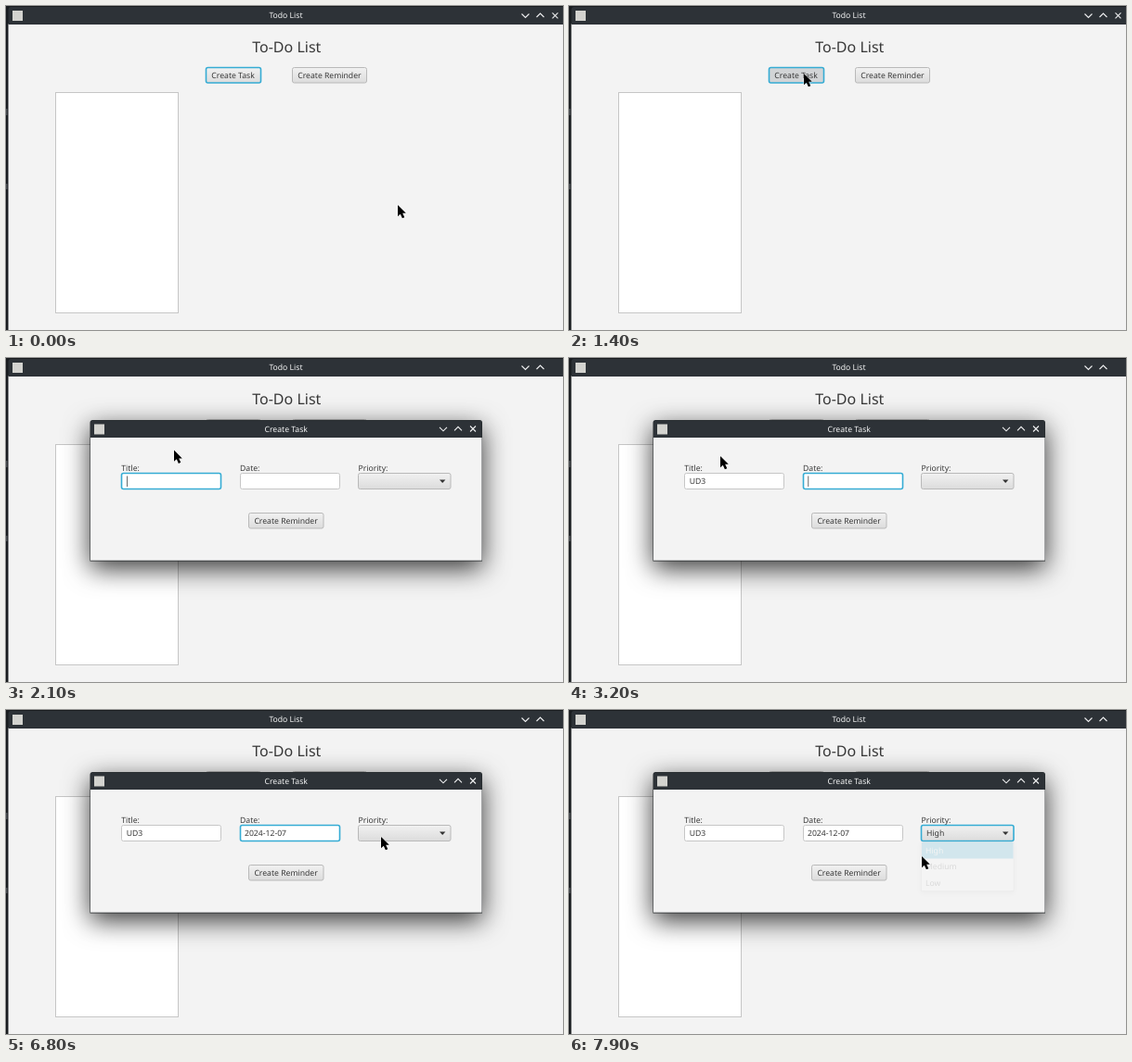
These frames come from a looping animation (600x350 px, 8000 ms). An HTML page:

```html
<!DOCTYPE html>
<html lang="en">
<head>
<meta charset="utf-8">
<title>Todo List</title>
<style>
  html, body { margin: 0; width: 100%; height: 100%; overflow: hidden; background: #f3f3f3; }
  svg { display: block; }
  text { font: 8.65px "Noto Sans", "Open Sans", sans-serif; fill: #383838; text-rendering: geometricPrecision; white-space: pre; }
  .mid { text-anchor: middle; }
  .bar { fill: #2d3237; }
  .caption { fill: #f4f5f5; text-anchor: middle; }
  .icon { fill: #d3d3cf; }
  .glyph { fill: none; stroke: #eff0f1; stroke-width: 1.1; }
  .button { fill: url(#face); stroke: #b9b9b9; }
  .field { fill: #fff; stroke: #c6c6c6; }
  .focus { stroke: #35acd4; stroke-width: 1.6; }
  .pressed { fill: #d2d4d6; }
  .shadow { filter: drop-shadow(0 8px 14px rgba(0, 0, 0, .78)); }
  .menu { fill: #fff; stroke: #c8c8c8; filter: drop-shadow(0 2px 3px rgba(0, 0, 0, .25)); }
  #hover { fill: #0096c9; }
  .row.on { fill: #fff; }
</style>
</head>
<body>
<svg width="600" height="350" viewBox="0 0 600 350">
  <defs>
    <linearGradient id="face" x2="0" y2="1">
      <stop stop-color="#f1f1f1"/><stop offset="1" stop-color="#dcdcdc"/>
    </linearGradient>
    <path id="down" class="glyph" d="M-4-2 0 2 4-2"/>
    <path id="up" class="glyph" d="M-4 2 0-2 4 2"/>
    <path id="cross" class="glyph" d="M-3-3 3 3M3-3-3 3"/>
  </defs>

  <rect width="600" height="350" fill="#191c1f"/>
  <path d="M0 111h1.5v7H0zM0 192h1.5v6H0z" fill="#4a4e52"/>
  <rect x="2.5" y="19" width="598" height="331" fill="#f3f3f3"/>
  <path class="bar" d="M2.5 20V4q0-3 3-3H600V20z"/>
  <rect class="icon" x="7" y="5" width="11" height="11"/>
  <text class="caption" x="301.5" y="13.3">Todo List</text>
  <use href="#down" x="559.5" y="10.5"/>
  <use href="#up" x="575.5" y="10"/>
  <use href="#cross" id="close" x="591.5" y="10.3"/>
  <text class="mid" x="302.3" y="50" style="font-size:16px">To-Do List</text>
  <rect class="button" id="task" x="215.5" y="66.5" width="59" height="16.5" rx="2"/>
  <text class="mid" x="244.6" y="78">Create Task</text>
  <rect class="button" x="308.5" y="66.5" width="80" height="16.5" rx="2"/>
  <text class="mid" x="348.4" y="78">Create Reminder</text>
  <rect class="field" x="53.5" y="93.5" width="132" height="238"/>

  <g id="dialog">
    <path class="shadow" fill="#24282b" d="M90.5 219.5V70q0-3 3-3H510q3 0 3 3V219.5z"/>
    <path class="bar" d="M91 86.5V70q0-2.5 2.5-2.5H510q2.5 0 2.5 2.5V86.5z"/>
    <rect x="91" y="86" width="421.6" height="132.7" fill="#f3f3f3"/>
    <rect class="icon" x="95" y="71.5" width="11" height="11"/>
    <text class="caption" x="301.7" y="79.7">Create Task</text>
    <use href="#down" x="471" y="76.8"/>
    <use href="#up" x="487" y="76.3"/>
    <use href="#cross" x="503" y="76.5"/>
    <text x="124.3" y="122">Title:</text>
    <text x="252" y="122">Date:</text>
    <text x="379.6" y="122">Priority:</text>
    <rect class="field" id="titleBox" x="124.5" y="124.5" width="107" height="17" rx="2"/>
    <rect class="field" id="dateBox" x="252.5" y="124.5" width="107" height="17" rx="2"/>
    <rect class="button" id="combo" x="379.5" y="124.5" width="99.5" height="17" rx="2"/>
    <path d="M467 131.5h6.4l-3.2 3.6z" fill="#333"/>
    <text id="title" x="129.7" y="136.3"></text>
    <text id="date" x="257" y="136.3"></text>
    <text id="priority" x="385" y="136.3"></text>
    <rect id="caret" y="127.5" width=".8" height="11.5" fill="#444"/>
    <rect class="button" x="261.5" y="167.5" width="80.5" height="16.5" rx="2"/>
    <text class="mid" x="301.6" y="178.7">Create Reminder</text>
  </g>

  <g id="popup">
    <rect class="menu" x="379.5" y="142.5" width="99.5" height="53"/>
    <rect id="hover" x="380" width="98.5" height="17.5"/>
    <text class="row" x="384" y="154.5">High</text>
    <text class="row" x="384" y="172">Medium</text>
    <text class="row" x="384" y="189.5">Low</text>
  </g>

  <path id="cursor" d="M0 0V12.2L2.8 9.7 4.9 14.3 7.3 13.2 5.2 8.8H8.8Z" stroke="#fff" stroke-width=".8" paint-order="stroke"/>
</svg>
<script>
const LOOP = 8000, STEP = 100;
const $ = id => document.getElementById(id);
const clamp = v => Math.max(0, Math.min(1, v));

// Pointer stops: time, x, y
const path = [
  [0, 422, 215], [300, 396, 178], [600, 342, 112], [900, 294, 71], [1200, 262, 72], [1400, 253, 73],
  [1700, 253, 74], [2200, 163, 106], [5800, 163, 106], [6000, 185, 108], [6100, 185, 108],
  [6300, 270, 115], [6400, 270, 115], [6500, 326, 122], [6600, 326, 122], [6800, 404, 137],
  [7300, 404, 137], [7400, 398, 172], [7500, 398, 172], [7600, 388, 170], [7700, 380, 158], [LOOP, 380, 158]
];
const titleKeys = [2400, 2600, 2700];
const dateKeys = [3400, 3500, 3600, 3800, 4200, 4500, 5000, 5300, 5700, 5900];

const typed = (text, keys, t) => text.slice(0, keys.filter(k => k <= t).length);
const show = (id, on) => $(id).setAttribute('visibility', on ? 'visible' : 'hidden');
const focus = (id, on) => $(id).classList.toggle('focus', on);

function pointer(t) {
  const i = path.findIndex(p => p[0] > t);
  const [t0, x0, y0] = path[i - 1], [t1, x1, y1] = path[i];
  const p = (t - t0) / (t1 - t0);
  return [x0 + (x1 - x0) * p, y0 + (y1 - y0) * p];
}

function draw(t) {
  const [x, y] = pointer(t);
  $('cursor').setAttribute('transform', `translate(${x} ${y})`);

  const modal = t >= 1600;
  show('close', !modal);
  focus('task', !modal);
  $('task').classList.toggle('pressed', t >= 1400 && !modal);

  // Dialog grows and fades in around its centre
  const open = 1 - (1 - clamp((t - 1575) / 195)) ** 2;
  $('dialog').setAttribute('opacity', modal ? open : 0);
  $('dialog').setAttribute('transform', `translate(302 143) scale(${.8 + .2 * open}) translate(-302 -143)`);

  const inTitle = t < 3100, inDate = !inTitle && t < 7000;
  focus('titleBox', inTitle);
  focus('dateBox', inDate);
  focus('combo', t >= 7000);
  $('title').textContent = typed('UD3', titleKeys, t);
  $('date').textContent = typed('2024-12-07', dateKeys, t);
  $('priority').textContent = t >= 7900 ? 'High' : '';

  const input = $(inTitle ? 'title' : 'date');
  $('caret').setAttribute('x', +input.getAttribute('x') + input.getComputedTextLength() + .4);
  show('caret', t < 6500);

  $('popup').setAttribute('opacity', Math.min(clamp((t - 6900) / 150), clamp((7915 - t) / 115)));
  const row = Math.floor((y - 143) / 17.5);
  show('hover', row >= 0);
  $('hover').setAttribute('y', 143 + row * 17.5);
  document.querySelectorAll('.row').forEach((el, i) => el.classList.toggle('on', i === row));
}

const start = performance.now();
function tick() {
  const t = (performance.now() - start) % LOOP;
  draw(Math.floor(t / STEP) * STEP);
  requestAnimationFrame(tick);
}
tick();
</script>
</body>
</html>
```
